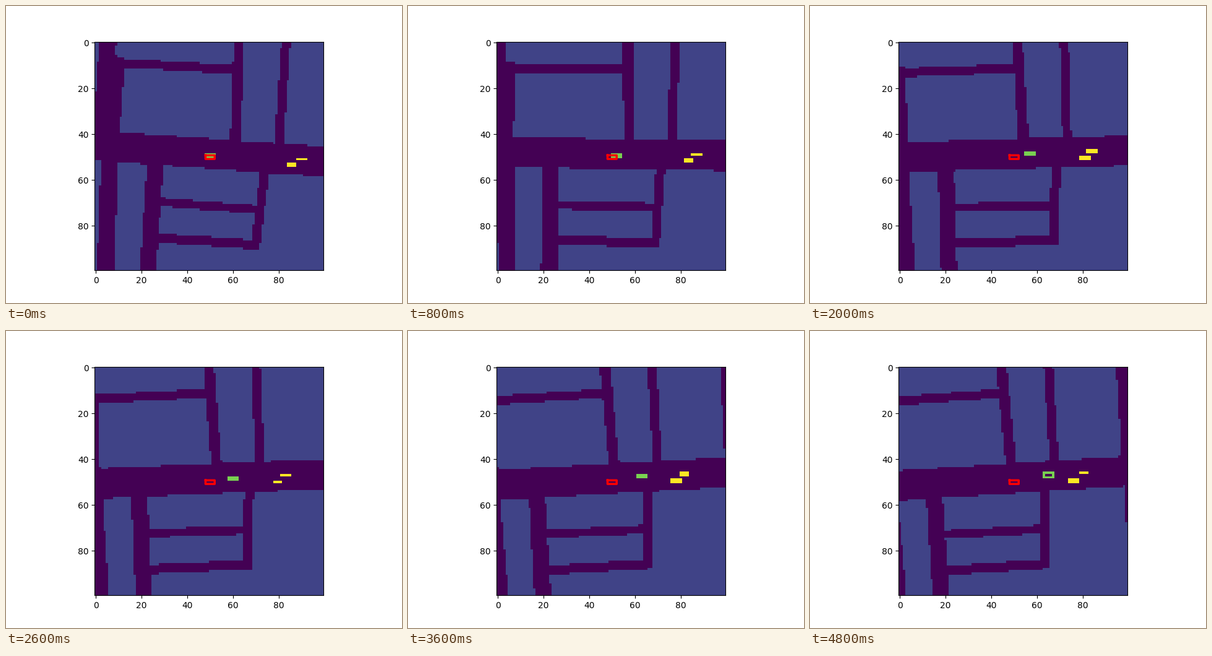
Recreate the animation shown at these times as a matplotlib script. Size 640 px wide and 480 px high, loop 4.9 s.

```python
import numpy as np
import matplotlib.pyplot as plt
from matplotlib.animation import FuncAnimation

N, FRAMES, STEP = 100, 49, 100
ROAD, BLOCK, LEAD, ONCOMING = 0, 1, 4, 5

# Straight streets through the blocks: x0, y0, x1, y1, width
STREETS = [
    (-60, 50.1, 160, 48.4, 13.1),     # main road
    (-2.4, -20, -2.4, 14, 7.4),       # west avenue
    (-0.2, 10, -0.2, 50, 11.8),
    (2.2, 50, 4.5, 110, 7.5),
    (22.3, 50, 22.9, 120, 7.1),
    (-3, 12.9, 55, 11.8, 3.95),       # north side
    (54.2, -10, 56.6, 45, 4.6),
    (75, -20, 75.5, 45, 3.95),
    (107, -20, 107.3, 50, 4.6),
    (24, 72.05, 69, 72.05, 3.75),     # south side
    (24, 87.8, 69, 87.35, 4),
    (70.6, 50, 68.7, 89.3, 4),
    (107.7, 50, 107.7, 120, 4.6),
]

t = np.arange(FRAMES) * STEP / 1000

# Ego pose: the turn settles while the car slows down
turn = 0.1415 * np.exp(-t / 1.65) - 0.0635
ego_x = 1.65 * t - 3.6 * np.exp(-t / 1.2)
drift = (turn[1:] + turn[:-1]) / 2 * np.diff(ego_x)
ego_y = -np.concatenate([[0], np.cumsum(drift)])
ego_x -= ego_x[13]
ego_y -= ego_y[13]

# Other cars as the ego sees them
lead_x = 50 + 15 * np.sin(np.pi / 2 * t / t[-1]) ** 1.5
lead_y = 49.72 - 0.56 * t
near_x = 84.1 - 1.75 * t + 1.4 * np.exp(-t)
near_y = 51.02 + 0.92 * turn * (near_x - 50)
far_x = 82.68 - 0.5 * t + 7.47 * np.exp(-t / 1.6)
far_y = 48.2 - 0.11 * t + 0.9 * turn * (far_x - 50)

CARS = [
    (LEAD, lead_x, lead_y, 2, 0.75),
    (ONCOMING, near_x, near_y, 1.8, 0.35),
    (ONCOMING, far_x, far_y, 1.8, 0.35),
]

dy, dx = np.mgrid[:N, :N] - 50


def on_street(x, y, street):
    x0, y0, x1, y1, width = street
    length = np.hypot(x1 - x0, y1 - y0)
    ux, uy = (x1 - x0) / length, (y1 - y0) / length
    along = (x - x0) * ux + (y - y0) * uy
    across = (y - y0) * ux - (x - x0) * uy
    return (along >= 0) & (along <= length) & (abs(across) <= width / 2)


def draw_car(grid, value, x, y, length, width):
    left, right = round(x - length), round(x + length)
    top, bottom = round(y - width), round(y + width)
    grid[top:bottom + 1, left:right + 1] = value
    grid[top + 1:bottom, left + 1:right] = ROAD


def render(i):
    c, s = np.cos(turn[i]), np.sin(turn[i])
    x = 50.5 + ego_x[i] + c * dx + s * dy
    y = 50.5 + ego_y[i] + c * dy - s * dx
    grid = np.full((N, N), BLOCK)
    for street in STREETS:
        grid[on_street(x, y, street)] = ROAD
    for value, car_x, car_y, length, width in CARS:
        draw_car(grid, value, car_x[i], car_y[i], length, width)
    return grid


fig, ax = plt.subplots(figsize=(6.4, 4.8), dpi=100)
image = ax.imshow(render(0), cmap="viridis", vmin=ROAD, vmax=ONCOMING,
                  interpolation="nearest")
ax.plot([48, 52, 52, 48, 48], [49.2, 49.2, 50.8, 50.8, 49.2],
        color="red", linewidth=2.5, snap=False)
ax.set_xlim(-0.5, N - 0.5)
ax.set_ylim(N - 0.5, -0.5)


def update(i):
    image.set_data(render(i))
    return [image]


anim = FuncAnimation(fig, update, frames=FRAMES, interval=STEP, repeat=True)
plt.show()
```
